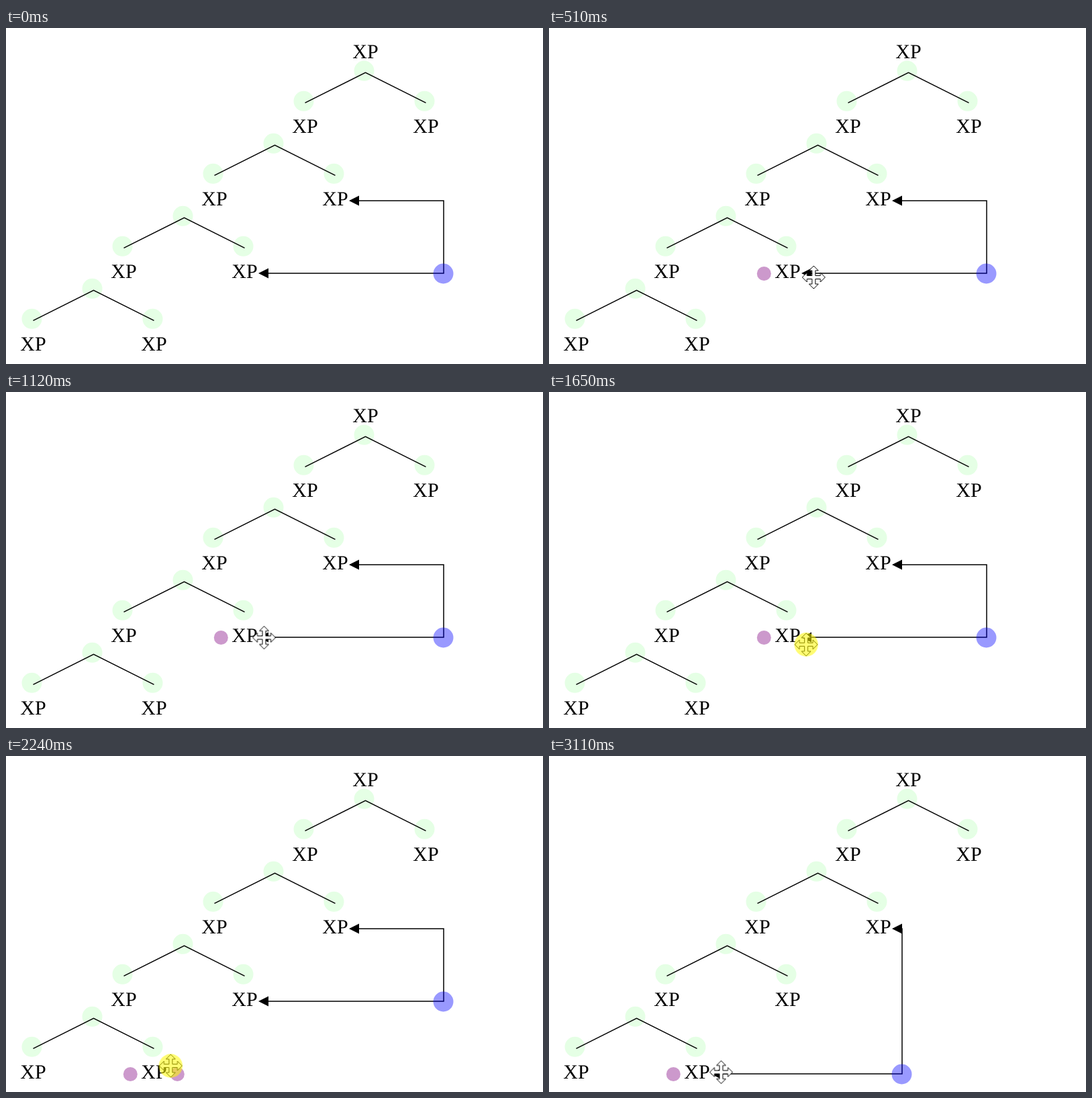
An HTML page that plays this animation: 800x500 px, repeating every 3.96 s.

```html
<!DOCTYPE html>
<html lang="en">
<head>
<meta charset="utf-8">
<title>Tree link drag</title>
<style>
  html, body { margin: 0; width: 100%; height: 100%; overflow: hidden; background: #fff; }
  svg { display: block; width: 800px; height: 500px; }
  text { font: 30px "Liberation Serif", "Times New Roman", serif; text-anchor: middle; text-rendering: geometricPrecision; }
  .branch, .wire { fill: none; stroke: #000; stroke-width: 1.5; }
  .node { fill: #e5ffe5; }
  .joint { fill: rgba(0, 0, 255, .4); }
  .port { fill: #cc99cc; }
  .pointer { fill: #fff; stroke: #000; stroke-width: 1; }
  .press { fill: rgba(255, 250, 0, .55); }
</style>
</head>
<body>
<svg id="stage" viewBox="0 0 800 500"></svg>
<script>
const LOOP = 3960, STEP = 20;
const ROW = 108, COL = 135;
const stage = document.getElementById('stage');

function add(parent, tag, attrs, text = '') {
  const el = document.createElementNS('http://www.w3.org/2000/svg', tag);
  for (const key in attrs) el.setAttribute(key, attrs[key]);
  el.textContent = text;
  parent.append(el);
  return el;
}

const circle = (parent, cx, cy, r, cls) => add(parent, 'circle', { cx, cy, r, class: cls });
const play = (el, frames) => el.animate(frames, { duration: LOOP, iterations: Infinity });

function show(el, from, to = LOOP) {
  play(el, [0, from, to, LOOP].map((t, i) =>
    ({ offset: t / LOOP, opacity: i === 1 ? 1 : 0, easing: 'step-end' })));
  return el;
}

// One branch: apex, two arms and the labels below them.
function branch(x, y) {
  for (const side of [-1, 0, 1])
    circle(stage, x - 2 + 90 * side, y - 2.5 + 45 * Math.abs(side), 15, 'node');
  add(stage, 'path', { class: 'branch', d: `M${x - 90} ${y + 45}l90 -45l90 45` });
  for (const side of [-1, 1]) label(x + 90 * side, y + 90);
}

function label(x, y) {
  add(stage, 'text', { x, y }, 'XP');
}

label(535.5, 44.5);
for (let i = 0; i < 4; i++) branch(535.5 - COL * i, 66.3 + ROW * i);

// A wire from the fixed upper label, round a bend, to a lower label.
function link(bend, tip, y) {
  const g = add(stage, 'g', {}), top = 257;
  const head = (x, hy) => add(g, 'path', { d: `M${x} ${hy}l15 -7.5v15z` });
  add(g, 'path', { class: 'wire', d: `M525 ${top}H${bend}V${y}H${tip + 13}` });
  head(511, top);
  head(tip, y);
  circle(g, bend - .5, y + .5, 15, 'joint');
  return g;
}

show(link(652, 376, 257 + ROW), 0, 3110);
show(link(526, 376 - COL, 257 + 2 * ROW), 3110);

const port = (x, row) => circle(stage, x, 257.5 + ROW * row, 10.5, 'port');
show(port(320.3, 1), 460, 1770);
show(port(320.3 - COL, 2), 2180);
show(port(390.3 - COL, 2), 2180, 3110);

// Four-way pointer: one arrow turned through four quarters.
const quarter = (x, y, n) => n ? quarter(-y, x, n - 1) : `${x},${y}`;
const arrow = n => [[-2.5, -10], [-7, -10], [0, -17], [7, -10], [2.5, -10], [2.5, -2.5]]
  .map(([x, y]) => quarter(x, y, n));
const pointer = add(stage, 'g', {});
add(pointer, 'polygon', { class: 'pointer', points: [0, 1, 2, 3].flatMap(arrow).join(' ') });
const press = circle(pointer, 0, 0, 17.7, 'press');

// Pointer moves; it rests between them. "via" bends the move.
const slowing = u => Math.sin(u * Math.PI / 2);
const home = [810, 360];
const moves = [
  { from: 0, until: 530, to: [393.5, 371], ease: slowing },
  { from: 560, until: 1120, to: [384.5, 365.5] },
  { from: 1580, until: 1650, to: [383, 376.5] },
  { from: 1740, until: 2240, to: [245.3, 461], via: [358, 433] },
  { from: 2240, until: 2600, to: [256.5, 470.5], ease: slowing }
];

function pointerAt(t) {
  let pos = home;
  for (const { from, until, to, via, ease = u => u } of moves) {
    if (t < from) break;
    const u = ease(Math.min(1, (t - from) / (until - from)));
    pos = pos.map((a, i) => {
      const mid = via ? via[i] : (a + to[i]) / 2;
      return (1 - u) ** 2 * a + 2 * u * (1 - u) * mid + u * u * to[i];
    });
  }
  return pos;
}

const track = [];
for (let t = 0; t <= LOOP; t += STEP) {
  const [x, y] = pointerAt(t);
  track.push({ offset: t / LOOP, transform: `translate(${x}px, ${y}px)` });
}
play(pointer, track);
show(pointer, 20);
show(press, 1380, 3070);
</script>
</body>
</html>
```
